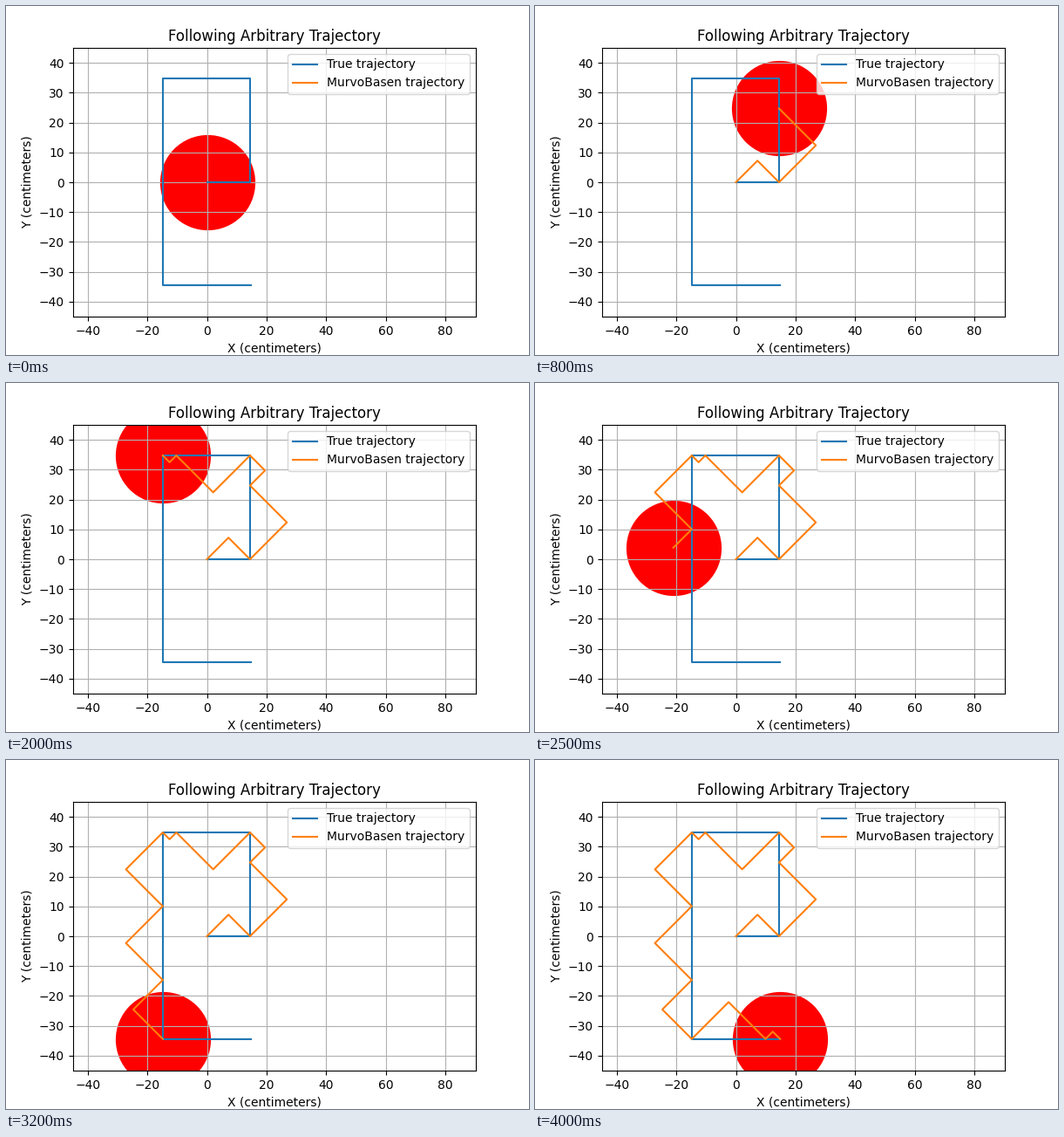
These frames come from a looping animation (600 px wide and 400 px high, 4.1 s). A matplotlib script:

```python
import numpy as np
import matplotlib.pyplot as plt
from matplotlib.animation import FuncAnimation
from matplotlib.patches import Circle
from matplotlib.transforms import IdentityTransform

WIDTH, HEIGHT, DPI = 600, 400, 100
FRAMES, INTERVAL = 41, 100
REACH = 24.7          # longest ground distance covered by one swing
HALF_SWING = 2        # frames from a foothold to the swing's apex
RADIUS = 54.6         # robot body, in pixels

# Corners of the path, and the side (+1 left, -1 right) of each leg's swings
corners = np.array([(0, 0), (14.45, 0), (14.45, 34.75),
                    (-14.8, 34.75), (-14.8, -34.4), (14.8, -34.4)])
sides = [1, -1, 1, -1, 1]


def swing_points():
    """Footholds and apexes of the zigzag walk along the path."""
    points = [corners[0]]
    for start, end, side in zip(corners, corners[1:], sides):
        length = np.hypot(*(end - start))
        ahead = (end - start) / length
        across = side * np.array([-ahead[1], ahead[0]])
        done = 0
        while length - done > 1e-6:
            half = min(REACH, length - done) / 2
            points.append(start + ahead * (done + half) + across * half)
            done += 2 * half
            points.append(start + ahead * done)
    return np.array(points)


points = swing_points()
knots = np.arange(len(points)) * HALF_SWING
steps = np.arange(FRAMES)
walk = np.column_stack([np.interp(steps, knots, points[:, k]) for k in (0, 1)])

fig, ax = plt.subplots(figsize=(WIDTH / DPI, HEIGHT / DPI), dpi=DPI)
ax.set_aspect("equal")
ax.set_xlim(-45, 90)
ax.set_ylim(-45, 45)
ax.grid(True)
ax.set_title("Following Arbitrary Trajectory")
ax.set_xlabel("X (centimeters)")
ax.set_ylabel("Y (centimeters)")

ax.plot(*corners.T, label="True trajectory")
trail, = ax.plot([], [], label="MurvoBasen trajectory")
ax.legend(loc="upper right")

body = Circle((0, 0), RADIUS, facecolor="red", linewidth=0,
              transform=IdentityTransform())
ax.add_patch(body)
fig.canvas.draw()


def pixel_center(point):
    """Centre of the pixel that holds a data point, in display units."""
    x, y = ax.transData.transform(point)
    return (np.floor(x + 0.5) + 0.5,
            HEIGHT - np.floor(HEIGHT - y + 0.5) - 0.5)


def update(i):
    body.center = pixel_center(walk[i])
    trail.set_data(*walk[:i + 1].T)
    return body, trail


anim = FuncAnimation(fig, update, frames=FRAMES, interval=INTERVAL,
                     repeat=True, repeat_delay=0)
plt.show()
```
